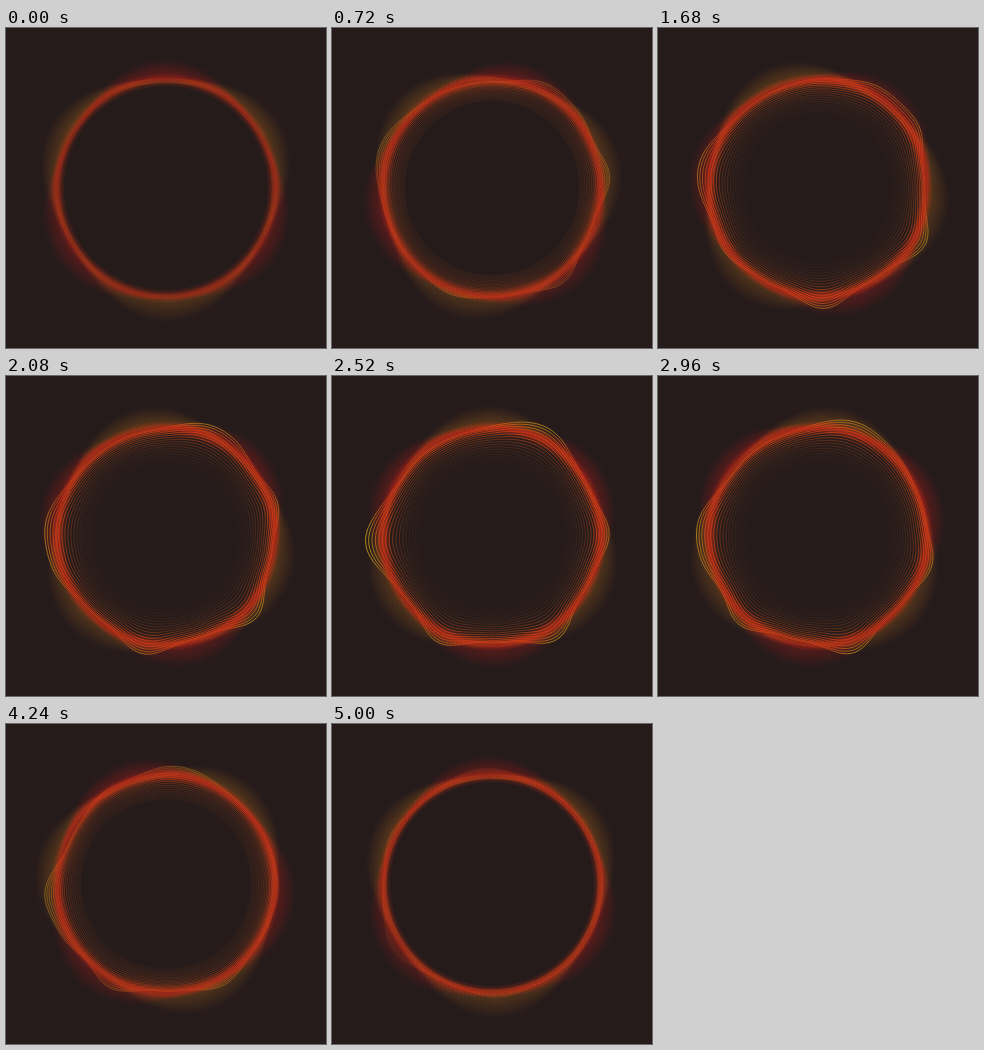
These frames come from a looping animation (320x320 px, 5080 ms). An HTML page with a canvas:

```html
<!DOCTYPE html>
<html>
<head>
<meta charset="utf-8">
<style>
  html, body { margin: 0; height: 100%; overflow: hidden; background: #261b1b; }
  canvas { display: block; width: 100vmin; height: 100vmin; }
</style>
</head>
<body>
<canvas id="stage" width="320" height="320"></canvas>
<script>
const ctx = document.getElementById('stage').getContext('2d');
const LOOP = 5080, CENTER = 160, RADIUS = 108;
const LINES = 18, HALO_STEPS = 24;
const rad = deg => deg * Math.PI / 180;

// Bell from 0 to 1, repeated `lobes` times around the circle
const bell = (angle, lobes) => 0.5 + 0.5 * Math.cos(lobes * angle);

// Lines are orange on the ring, yellow outside it, fading inside it
const lineColor = ctx.createRadialGradient(CENTER, CENTER, 0, CENTER, CENTER, 128);
[[70, '120,70,20,0'], [84, '135,70,22,.22'], [96, '180,75,22,.5'], [103, '230,80,22,.75'],
 [108, '240,72,24,.85'], [113, '230,95,22,.85'], [118, '200,135,25,.9'], [125, '205,165,30,1']]
  .forEach(([r, rgba]) => lineColor.addColorStop(r / 128, `rgba(${rgba})`));

function strokePolar(radiusAt, dy = 0) {
  ctx.beginPath();
  for (let deg = 0; deg < 360; deg += 2) {
    const a = rad(deg), r = radiusAt(a);
    ctx.lineTo(CENTER + r * Math.cos(a), CENTER + dy + r * Math.sin(a));
  }
  ctx.closePath();
  ctx.stroke();
}

// Three soft lobes, densest at their tips' angles and thinning outwards
function drawHalo(rgb, phase, reach) {
  const color = ctx.createConicGradient(phase, CENTER, CENTER);
  for (let i = 0; i <= 6; i++) color.addColorStop(i / 6, `rgba(${rgb},${i % 2 ? 0.018 : 0.085})`);
  ctx.strokeStyle = color;
  ctx.lineWidth = 5;
  for (let i = 0; i < HALO_STEPS; i++) {
    const u = i / HALO_STEPS;
    ctx.globalAlpha = 1 - u;
    strokePolar(a => RADIUS + reach * u * bell(a - phase, 3), 2 * u);
  }
  ctx.globalAlpha = 1;
}

function drawRing(glow) {
  for (const width of [12, 8, 5]) {
    ctx.lineWidth = width;
    ctx.strokeStyle = `rgba(215,50,22,${0.12 + 0.05 * glow})`;
    strokePolar(() => RADIUS);
  }
}

function drawLines(seconds, spread) {
  const back = rad(206 - 11.5 * seconds), ahead = rad(-32 + 35.5 * seconds);
  const wave = a =>
    18 * (bell(a - back, 3) ** 3 - 0.25) * bell(a - back - 0.87, 1) +
    15 * (bell(a - ahead, 6) ** 2 - 0.25) * bell(a - ahead - 0.3, 1);
  ctx.strokeStyle = lineColor;
  ctx.lineWidth = 0.85;
  ctx.globalAlpha = Math.min(1, spread * 0.95);
  for (let k = LINES - 1; k >= 0; k--) {
    const u = k / (LINES - 1);
    const base = RADIUS + 3 - 40 * spread * u ** 1.15;
    const swing = Math.sqrt(spread) * (1 - u) ** 1.7;
    strokePolar(a => base + swing * wave(a));
  }
  ctx.globalAlpha = 1;
}

function draw(now) {
  const time = now % LOOP, t = time / LOOP;
  const spread = Math.sin(Math.PI * t) ** 0.65;
  const turn = rad(89 + 120 * t);
  ctx.fillStyle = '#261b1b';
  ctx.fillRect(0, 0, 320, 320);
  ctx.globalCompositeOperation = 'lighter';
  drawHalo('130,75,0', turn, 24);
  ctx.globalCompositeOperation = 'source-over';
  drawRing(spread);
  drawLines(time / 1000, spread);
  drawHalo('190,26,27', turn + Math.PI / 3, 22);
}

const start = performance.now();
function tick() {
  draw(performance.now() - start);
  requestAnimationFrame(tick);
}
tick();
</script>
</body>
</html>
```
